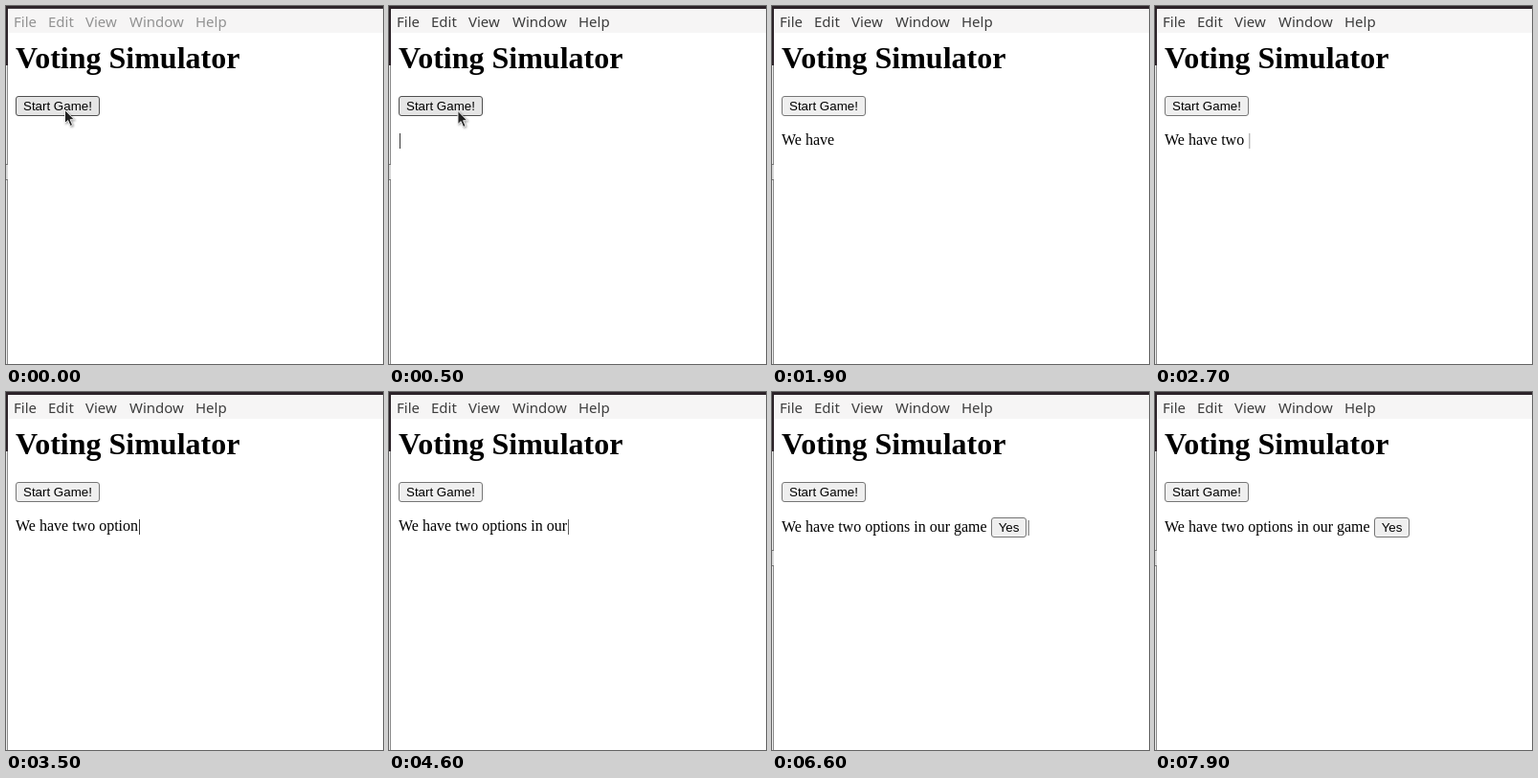
Animation of 394x374 px, one loop 8000 ms. Source, as an HTML page:

```html
<!DOCTYPE html>
<html lang="en">
<head>
<meta charset="utf-8">
<title>Voting Simulator</title>
<style>
  html, body { margin: 0; width: 100%; height: 100%; overflow: hidden; background: #fff; }
  body { position: relative; font: 16px "Liberation Serif", "Times New Roman", serif; color: #000; cursor: none; }
  body > * { position: absolute; margin: 0; white-space: pre; }
  #desk { left: 0; top: 0; width: 2px; height: 374px;
    background: linear-gradient(#2c2329 62px, transparent 62px), linear-gradient(90deg, #efefef 1px, #8c8c8c 1px); }
  #notch { left: 0; top: 165px; width: 2px; height: 15px; background: #d8d8d8;
    border: solid #777; border-width: 1px 0; }
  #top { left: 0; top: 0; width: 394px; height: 2px; background: #2c2329; }
  #menu { left: 2px; top: 2px; width: 392px; height: 25px; background: #f6f5f5;
    border-top: 1px solid #2c2329; font: 15px/26px "Noto Sans", "Open Sans", sans-serif; color: #3d3d3d; }
  #menu span { position: absolute; top: 0; }
  #menu.idle { color: #929292; border-color: #454045; }
  h1 { left: 10px; top: 36px; font-size: 32px; }
  .btn { display: inline-block; box-sizing: border-box; padding: 2px 7px; border: 1px solid #767676;
    border-radius: 3px; background: #efefef; font: 13.3333px "Liberation Sans", Arial, sans-serif; }
  .btn:empty { vertical-align: -3px; }
  .btn.hover { background: #e5e5e5; border-color: #4f4f4f; }
  #start { left: 10px; top: 94px; }
  #line { left: 10px; top: 131.4px; }
  #mouse { left: 0; top: 0; overflow: visible; filter: drop-shadow(1px 1px 1px #0006); }
</style>
</head>
<body>
<div id="desk"></div>
<div id="notch"></div>
<div id="top"></div>
<div id="menu"><span style="left:6px">File</span><span style="left:42px">Edit</span><span style="left:81px">View</span><span style="left:127px">Window</span><span style="left:196px">Help</span></div>
<h1>Voting Simulator</h1>
<div id="start" class="btn">Start Game!</div>
<p id="line"><span id="text"></span><span id="yes" class="btn"></span><span id="caret">|</span></p>
<svg id="mouse" width="12" height="20"><path d="M.5 .5V14.5L3.7 11.6 6.2 17.4 8.6 16.4 6.1 10.7H10.4Z" fill="#222" stroke="#fff" stroke-width=".9"/></svg>
<script>
const LOOP = 8000, STEP = 100;
const CLICK = 450, CHAR = 142;
const sentence = "We have two options in our game ";
const $ = id => document.getElementById(id);
const [menu, start, notch, text, yes, caret, mouse] =
  ["menu", "start", "notch", "text", "yes", "caret", "mouse"].map($);
const show = (el, on) => { el.style.display = on ? "" : "none"; };
const put = (el, s) => { if (el.textContent !== s) el.textContent = s; };

function draw(t) {
  // pointer glides off the button, then hides while text is typed
  const p = Math.min(1, Math.max(0, (t - CLICK) / 450));
  const ease = p * p * (3 - 2 * p);
  mouse.style.transform = `translate(${61 + 306 * ease}px, ${108 + 29 * ease}px)`;
  show(mouse, t < 1400);
  menu.classList.toggle("idle", t < 400);
  start.classList.toggle("hover", t < 600);
  show(notch, t < 2500 || t >= 5400);

  // one character per tick; the button tag takes a tick of its own
  const n = Math.max(0, 7 + Math.floor((t - 1900) / CHAR));
  const inButton = n - sentence.length - 1;
  put(text, sentence.slice(0, n));
  show(yes, inButton >= 0);
  put(yes, "Yes".slice(0, Math.max(0, inButton)));

  // caret fades with a one second period, starting full at the click
  show(caret, t >= CLICK);
  const glow = (1 + Math.cos((t - CLICK) / 1000 * 2 * Math.PI)) / 2;
  caret.style.opacity = glow < 0.03 ? 0 : glow;
}

const t0 = performance.now();
function tick() {
  const t = (performance.now() - t0) % LOOP;
  draw(Math.floor(t / STEP) * STEP);
  requestAnimationFrame(tick);
}
tick();
</script>
</body>
</html>
```
